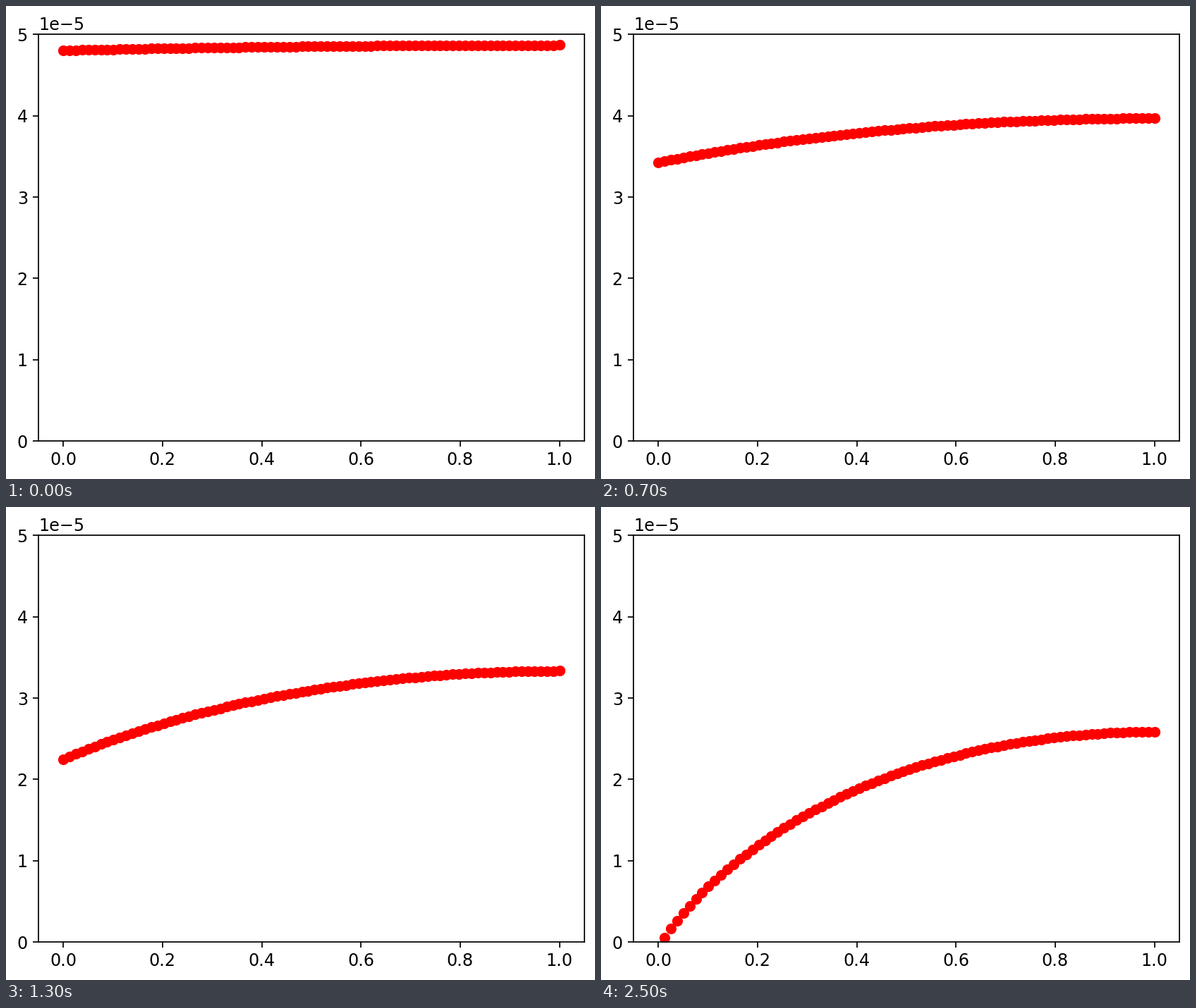
These frames come from a looping animation (835 px wide and 671 px high, 2600 ms). A matplotlib script:

```python
import numpy as np
import matplotlib.pyplot as plt
from matplotlib.animation import FuncAnimation

WIDTH, HEIGHT, DPI = 835, 671, 156
FRAMES, INTERVAL = 26, 100
UNIT = 1e-5

x = np.linspace(0, 1, 80)

# Radius at the closed end, sampled over time and smoothed by a polynomial.
END_STEPS = [-1, 0, 6, 12, 18, 22, 24, 25]
END_RADII = [5.0, 4.869, 4.090, 3.430, 2.918, 2.680, 2.600, 2.587]
end_radius = np.poly1d(np.polyfit(END_STEPS, END_RADII, 5))


def radius(step):
    """Pore radius along x: the mouth closes linearly, the far end lags."""
    mouth = 5 - 0.1967 * (step + 1)
    end = end_radius(step)
    phase = step / (FRAMES - 1)
    depth = (1 - x) ** 2
    strength = 0.08 + 0.275 * phase ** 1.8
    power = 0.88 - 0.26 * phase ** 10
    shape = depth * (1 - strength * (1 - depth) ** power)
    return (end + (mouth - end) * shape) * UNIT


plt.rcParams["font.family"] = "DejaVu Sans"
plt.rcParams["font.size"] = 11
fig = plt.figure(figsize=((WIDTH + 1e-6) / DPI, (HEIGHT + 1e-6) / DPI), dpi=DPI,
                 facecolor="white")
ax = fig.add_axes([46 / WIDTH, 54 / HEIGHT,
                   4.96 * DPI / WIDTH, 3.696 * DPI / HEIGHT])
ax.tick_params(labelsize=11)
ax.set_xlim(-0.05, 1.05)
ax.set_ylim(0, 5 * UNIT)
points, = ax.plot(x, radius(0), "ro")


def update(step):
    points.set_ydata(radius(step))
    return points,


anim = FuncAnimation(fig, update, frames=FRAMES, interval=INTERVAL,
                     repeat=True, repeat_delay=0)
plt.show()
```
